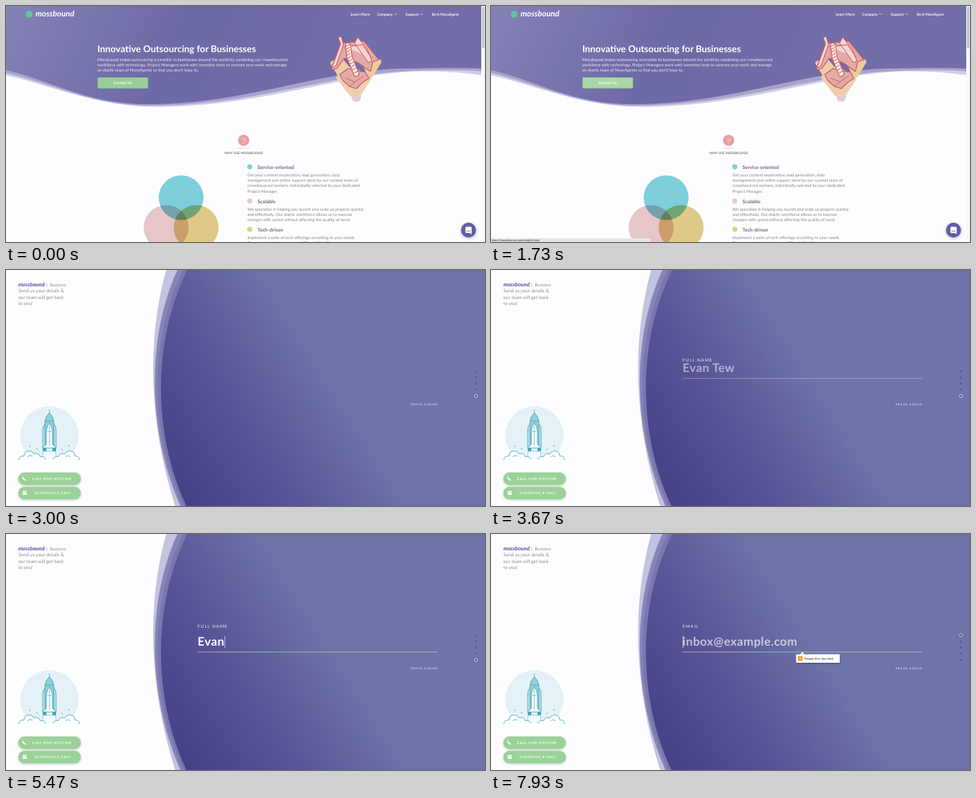
These frames come from a looping animation (640 by 317 pixels, 8 s). An HTML page with a canvas:

```html
<!DOCTYPE html>
<html lang="en">
<head>
<meta charset="utf-8">
<title>Outsourcing site walkthrough</title>
<style>
  html, body { margin: 0; width: 100%; height: 100%; overflow: hidden; background: #fff; }
  canvas { display: block; width: 640px; height: 317px; }
</style>
</head>
<body>
<canvas id="stage"></canvas>
<script>
const canvas = document.getElementById("stage");
const ctx = canvas.getContext("2d");
const ratio = window.devicePixelRatio || 1;
canvas.width = 640 * ratio;
canvas.height = 317 * ratio;

const LOOP = 8000;
const SANS = "Lato, 'Open Sans', sans-serif";
const SYSTEM = "'Liberation Sans', Arial, sans-serif";
const BRAND = "Mossbound";
const AGENT = "MossAgent";
const NAME = "Evan Tew";
const EMAIL = "inbox@example.com";
const PAGE = "mossbound.com/formb2b.html";
const KEY_TIMES = [4950, 5080, 5210, 5340, 5510, 5610, 5710, 5810];

// Moments of the walkthrough, in ms
const T = {
  hover: 1400, modal: 1930, pick: 2270, form: 2950, nameIn: 3200, nameFocus: 3900,
  submit: 5930, emailIn: 6140, tip: 6400, emailFocus: 6550
};
const SLIDE = { distance: 317, length: 700, delay: 150 };

const clamp = v => Math.max(0, Math.min(1, v));
const span = (t, start, length) => clamp((t - start) / length);
const easeOut = p => 1 - (1 - p) ** 3;

// Distance left to travel on the way in, and distance covered on the way out
const slideIn = (t, start) => {
  const p = span(t, start, SLIDE.length);
  return p < 1 ? SLIDE.distance * 2 ** (-10 * p) : 0;
};
const slideOut = (t, start) => SLIDE.distance * span(t, start, 350) ** 2;

function text(str, x, y, size, color, opt = {}) {
  const { weight = 400, style = "normal", align = "left", gap = 0, family = SANS } = opt;
  ctx.font = `${style} ${weight} ${size}px ${family}`;
  ctx.textAlign = align;
  ctx.letterSpacing = gap + "px";
  ctx.fillStyle = color;
  ctx.fillText(str, x, y + size * .34);
  return ctx.measureText(str).width;
}

function lines(list, x, y, step, size, color, opt) {
  list.forEach((s, i) => text(s, x, y + i * step, size, color, opt));
}

function rect(x, y, w, h, fill, r = 0) {
  ctx.beginPath();
  ctx.roundRect(x, y, w, h, r);
  ctx.fillStyle = fill;
  ctx.fill();
}

function disc(x, y, r, fill) {
  ctx.beginPath();
  ctx.arc(x, y, r, 0, Math.PI * 2);
  ctx.fillStyle = fill;
  ctx.fill();
}

function path(d, fill, stroke, width = 1) {
  const p = new Path2D(d);
  if (fill) { ctx.fillStyle = fill; ctx.fill(p); }
  if (stroke) {
    ctx.strokeStyle = stroke;
    ctx.lineWidth = width;
    ctx.lineJoin = ctx.lineCap = "round";
    ctx.stroke(p);
  }
}

function gradient(x0, y0, x1, y1, ...colors) {
  const g = ctx.createLinearGradient(x0, y0, x1, y1);
  colors.forEach((c, i) => g.addColorStop(i / (colors.length - 1), c));
  return g;
}

function layer(alpha, draw, dx = 0, dy = 0) {
  ctx.save();
  ctx.globalAlpha *= alpha;
  ctx.translate(dx, dy);
  draw();
  ctx.restore();
}

function shadowed(color, blur, dy, draw) {
  ctx.save();
  ctx.shadowColor = color;
  ctx.shadowBlur = blur * ratio;
  ctx.shadowOffsetY = dy * ratio;
  draw();
  ctx.restore();
}

function drawClaw() {
  const red = "#c9565d", pink = "#e3aaa8", pale = "#f3d6d1";
  const tile = (d, color) => path(d, color, color, 7);
  tile("M465 121L471 121L470 125L466 125Z", "#e3cdd3");
  tile("M445 96L462 84L484 98L471 118L462 118Z", "#f1cfae");
  tile("M437 77L448 74L456 84L447 93Z", "#f0cda9");
  tile("M478 75L498 75L487 93Z", "#efcb98");
  path("M447 50L478 47L498 72L490 75L487 88L470 76L452 70L442 84L434 86Z", pink, red, 1.1);
  path("M444 42L448 41L451 52L441 80L435 84L447 51Z", pale, red, 1);
  path("M452 55L476 52L488 69M470 42L482 57L489 74L484 76L466 50Z", pale, red, 1);
  path("M446 92L457 84L480 89L485 97L476 103L468 111L459 108L450 100Z", pink, red, 1.1);
  path("M454 97L466 102L478 94M459 108L466 102", null, red, .8);
  path("M457 53L459 69L468 91", null, red, 8);
  path("M457 53L459 69L468 91", null, "#f8e6df", 6);
  for (let i = 0; i < 10; i++) {
    const y = 53 + i * 4, x = 456 + i * i * .13;
    path(`M${x - 2.2} ${y + 1.5}L${x + 3} ${y - 1.5}`, null, red, .9);
  }
}

function drawHero(W, mid, end, hover) {
  const tail = W + 1;
  path(`M0 0V93C66 108 122 136 205 135.5C345 134 445 92 545 88C590 87 612 90 ${tail} 93V0Z`, "#cfcee6");
  path(`M0 0V90C62 104 114 134 196 134C335 133 435 90 548 87C590 86 615 86 ${tail} 88V0Z`, "#a6a4cd");
  path(`M0 0V86C60 100 108 132 190 132C322 132 418 86 532 84C575 83 610 83 ${tail} 84V0Z`,
    gradient(0, 0, 420, 190, "#8482b5", "#6c69a7", "#716eaa"));

  disc(31, 11, 4.5, "#62c49f");
  text(BRAND.toLowerCase(), 39.5, 10.5, 10.8, "#fff", { weight: 700, style: "italic" });

  layer(1, () => {
    const nav = { weight: 700 };
    text("Learn More", 460.5, 11, 5, "#fff", nav);
    text("Company", 496, 11, 4.9, "#fff", nav);
    text("Support", 534, 11, 4.9, "#fff", nav);
    text("Be A " + AGENT, 569, 11, 4.9, "#fff", nav);
    path("M518.8 10.4l1.5 1.5l1.5-1.5M553.6 10.4l1.5 1.5l1.5-1.5", null, "#fff", .6);
  }, end);

  layer(1, () => {
    text("Innovative Outsourcing for Businesses", 122, 58.2, 12.45, "#fff", { weight: 700 });
    lines([
      BRAND + " makes outsourcing accessible to businesses around the world by combining our crowdsourced",
      "workforce with technology. Project Managers work with inventive tools to oversee your work and manage",
      `an elastic team of ${AGENT}s so that you don't have to.`
    ], 122, 72, 7.3, 5.48, "#f1f0f8");
    rect(122.5, 96, 67, 15, "#85bd87", 1);
    rect(122.5, 96, 67, 13.7, hover ? "#a9d8a5" : "#98cf98", 1);
    text("Contact Us", 156, 103.5, 5, "#fff", { weight: 700, align: "center" });
    drawClaw();
  }, mid);
}

function drawFeature(y, color, title, body) {
  disc(325.7, y - .7, 3.4, color);
  text(title, 336, y, 6.6, "#6a6785", { weight: 700 });
  lines(body, 322.5, y + 10.2, 7.35, 5.5, "#82828c");
}

function drawHome(hover, locked) {
  const W = locked ? 640 : 635, end = W - 635, mid = end / 2;
  rect(0, 0, 640, 317, "#fdfdff");
  drawHero(W, mid, end, hover);

  layer(1, () => {
    disc(317.5, 180.5, 7.6, "#e5a19e");
    path("M314.8 178h4.5l1 2l-3 2.6v2.4M316 180h3", null, "#f6d9d6", .7);
    path("M310 191h15", null, "#eac5c4", .7);
    text("WHY USE " + BRAND.toUpperCase(), 317.5, 197, 4.55, "#4c4c55", { align: "center" });

    ctx.globalCompositeOperation = "multiply";
    disc(234, 257.5, 30, "#80d0dc");
    disc(214, 297.5, 30, "#e9c8c8");
    disc(254, 297.5, 30, "#e1cb86");
    ctx.globalCompositeOperation = "source-over";

    drawFeature(216.7, "#80d0dc", "Service-oriented", [
      "Get your content moderation, lead generation, data",
      "management and online support done by our curated team of",
      "crowdsourced workers, individually selected by your dedicated",
      "Project Manager."
    ]);
    drawFeature(262.7, "#e9c8c8", "Scalable", [
      "We specialise in helping you launch and scale up projects quickly",
      "and effectively. Our elastic workforce allows us to execute",
      "changes with speed without affecting the quality of work."
    ]);
    drawFeature(300.7, "#e1cb86", "Tech-driven", [
      "Implement a suite of tech offerings according to your needs.",
      "Our range includes web apps, API and Workflow"
    ]);
  }, mid);

  if (!locked) {
    rect(635, 0, 5, 317, "#f8f8f9");
    rect(636, 1, 3.2, 56, "#c3c3c6", 1.6);
  }
}

function drawChat(x) {
  shadowed("rgba(40,30,90,.35)", 4, 1, () => disc(x, 301, 10, "#615da2"));
  rect(x - 4.2, 296.5, 8.4, 8.6, "#fff", 1.4);
  path(`M${x + 1} 304.5h3.2v2.2z`, "#fff");
  path(`M${x - 2.5} 302q2.5 1.7 5 0`, null, "#615da2", .8);
}

function drawStatus() {
  rect(0, 312, 213, 5, "#e6e6e9");
  text("https://" + PAGE, 1, 314.7, 3.9, "#2c2c30", { family: SYSTEM });
}

function drawModal(filled) {
  shadowed("rgba(50,45,110,.35)", 5, 1, () => rect(166, 47, 320.5, 150, "#fefeff", 2));
  text(`Thank you for choosing ${BRAND}!`, 326, 61.5, 7.2, "#4d4b66", { weight: 700, align: "center" });
  path("M166 75H486.5M326.3 94V168", null, "#dddce6", .7);
  const body = { align: "center" };
  lines(["If you're looking to engage in our outsourcing services,",
    "click on “Business” below to get in touch with our team", "now."], 246, 106.7, 7.5, 5.5, "#77777f", body);
  lines([`If you're interested in becoming a ${AGENT}, click on`,
    `“${AGENT}” below to find out more and submit your`, "application."], 406, 106.7, 7.5, 5.5, "#77777f", body);

  const button = (x, label, full) => {
    rect(x, 133, 59, 15, "#44b96f", 1);
    if (!full) rect(x + .8, 133.8, 57.4, 13.4, "#fefeff", .6);
    text(label, x + 29.5, 140.5, 6.25, full ? "#fff" : "#44b96f", { weight: 700, align: "center" });
  };
  button(217, "Business", filled);
  button(377, AGENT, false);
}

function drawRocket() {
  const teal = "#4aa3b5", pale = "#8fd0dc";
  disc(58, 222, 39, "#e4f2f8");
  path("M49 238V216Q49 208 53 207V240ZM67 238V216Q67 208 63 207V240Z", "#bfe4ec", teal, .8);
  path("M52 238V204Q53 196 58 192.5Q63 196 64 204V238Z", pale, teal, .9);
  path("M53 203H63M58 192.5V188", null, teal, .8);
  path("M54 234V216Q55 209 58 206Q61 209 62 216V234L67 239H49Z", "#fff", teal, .8);
  path("M58 210V236M55.5 217H60.5", null, teal, .7);
  rect(49, 239, 5, 4.5, teal, 1);
  rect(62, 239, 5, 4.5, teal, 1);
  path("M50 244L48 256H68L66 244Z", "#f3fbfd", pale, .7);
  path("M17 261V255Q18 249 24 250Q24 243 31 243Q36 243 37 247Q44 245 46 251Q51 249 53 254H63Q65 249 70 251Q72 245 79 247Q80 243 85 243Q92 243 92 250Q98 249 99 255V261Z", "#fefeff");
  path("M17 255Q18 249 24 250Q24 243 31 243Q36 243 37 247Q44 245 46 251Q51 249 53 254M63 254Q65 249 70 251Q72 245 79 247Q80 243 85 243Q92 243 92 250Q98 249 98 255M29 251q2-3 6-1M80 251q3-3 6 0", null, teal, .8);
  [[32, 237], [84, 236], [41, 240], [75, 241]].forEach(([x, y]) => disc(x, y, .8, teal));
}

function drawSide() {
  const w = text(BRAND.toLowerCase(), 16.5, 20, 7.3, "#544b96", { weight: 700, style: "italic" });
  text("|  Business", 16.5 + w + 2.5, 20, 5.7, "#8c8c95");
  lines(["Send us your details &", "our team will get back", "to you!"], 16.5, 28.3, 8.1, 6.3, "#8c8c95");
  drawRocket();
  const pill = (y, label, x) => {
    shadowed("rgba(60,110,70,.4)", 3, 1, () => rect(16.5, y, 83.5, 16.5, "#9ad298", 8.2));
    text(label, x, y + 8, 4.6, "#fff", { weight: 700, gap: .62 });
  };
  pill(272, "CALL OUR HOTLINE", 35);
  pill(291.3, "SCHEDULE A CALL", 38);
  path("M22.3 278.2q.5 3.3 3.9 4", null, "#fff", 1.5);
  rect(22.3, 296.8, 5.4, 5.2, "#fff", .6);
  path("M23 298.8H27", null, "#9ad298", .6);
}

function drawCurve() {
  path("M214 0C189 90 189 200 226 317H640V0Z", "#c3c4e0");
  path("M229 0C188 90 188 215 233 317H640V0Z", "#8784b8");
  path("M236 0C191 95 191 215 237 317H640V0Z", "#7a77b0");
  path("M242 0C195.5 95 195.5 220 241 317H640V0Z",
    gradient(212, 304, 440, 160, "#433f84", "#575397", "#6f73a9"));
}

function drawDots(t) {
  const focused = t >= T.emailFocus;
  for (let i = 0; i < 5; i++) disc(628, 136 + i * 8.3, 1, "#4b4885");
  ctx.beginPath();
  ctx.arc(628, t >= T.submit ? 136 : 169.2, 2.1, 0, Math.PI * 2);
  ctx.strokeStyle = focused ? "#a5d3ad" : "#d4d4e8";
  ctx.lineWidth = .8;
  ctx.stroke();
}

// Label and input move separately; each fades with its distance from rest
function drawField(label, value, hint, labelY, inputY, focus, caret) {
  const fade = y => clamp(1 - Math.abs(y) / SLIDE.distance);
  layer(fade(labelY), () => text(label, 256, 124, 5.7, "#f2f2f8", { gap: 1 }), 0, labelY);
  layer(fade(inputY), () => {
    const opt = { weight: 700, gap: .4 };
    const w = value ? text(value, 256, 145, 16, "#fff", opt) : 0;
    if (!value) text(hint, 256, 145, 16, `rgba(255,255,255,${.55 + .1 * focus})`, opt);
    if (caret) rect(256 + w, 137, .7, 16, "#e9e9f4");
    rect(256, 158.2, 320, .8, "rgba(255,255,255,.38)");
    layer(focus, () => rect(256, 158.2, 320, .8, "#96bca6"));
  }, 0, inputY);
}

function drawTip(y) {
  shadowed("rgba(20,20,50,.5)", 3, 1, () => {
    path(`M412.5 ${y - 5.5}L416 ${y - 8.7}L419.5 ${y - 5.5}Z`, "#fff");
    rect(407.5, y - 5.8, 58.5, 11.6, "#fff", 1);
  });
  rect(410, y - 3.2, 6.4, 6.4, "#f4a52c", 1);
  text("!", 413.2, y, 5, "#fff", { weight: 700, align: "center" });
  text("Please fill in this field.", 418.8, y, 4.1, "#26262a", { family: SYSTEM });
}

function drawForm(t) {
  rect(0, 0, 640, 317, "#fdfdff");
  drawSide();
  drawCurve();
  text("PRESS ENTER", 576.8, 180.5, 4.2, "#e8e8f3", { align: "right", gap: .92 });
  drawDots(t);

  const late = t - SLIDE.delay;
  const blink = start => t >= start && (t - start) % 1000 < 500;

  if (t < T.emailIn + SLIDE.delay) {
    const typed = KEY_TIMES.filter(k => t >= k).length;
    const caret = t < T.submit && (typed ? true : blink(T.nameFocus));
    drawField("FULL NAME", NAME.slice(0, typed), NAME,
      -slideIn(t, T.nameIn) - slideOut(t, T.submit),
      -slideIn(late, T.nameIn) - slideOut(t, T.submit),
      span(t, T.nameFocus, 200), caret);
  }
  if (t >= T.emailIn) {
    drawField("EMAIL", "", EMAIL, slideIn(t, T.emailIn), slideIn(late, T.emailIn),
      span(t, T.emailFocus, 200), blink(T.emailFocus));
  }
  // The bubble follows the input one screen refresh behind
  if (t >= T.tip) drawTip(167.3 + slideIn(late - 17, T.emailIn));
}

function drawSite(t) {
  const open = easeOut(span(t, T.modal, 260));
  const locked = t >= T.modal;
  drawHome(t >= T.hover, locked);
  layer(open, () => rect(0, 0, 640, 317, "rgba(132,128,190,.72)"));
  drawChat(locked ? 623 : 618);
  if (t >= T.hover) drawStatus();
  layer(open, () => drawModal(t >= T.pick));
}

function frame(now) {
  const t = now % LOOP;
  ctx.setTransform(ratio, 0, 0, ratio, 0, 0);
  ctx.textBaseline = "alphabetic";
  ctx.textRendering = "geometricPrecision";
  if (t < T.form) drawSite(t);
  else drawForm(t);
  requestAnimationFrame(frame);
}
requestAnimationFrame(frame);
</script>
</body>
</html>
```
